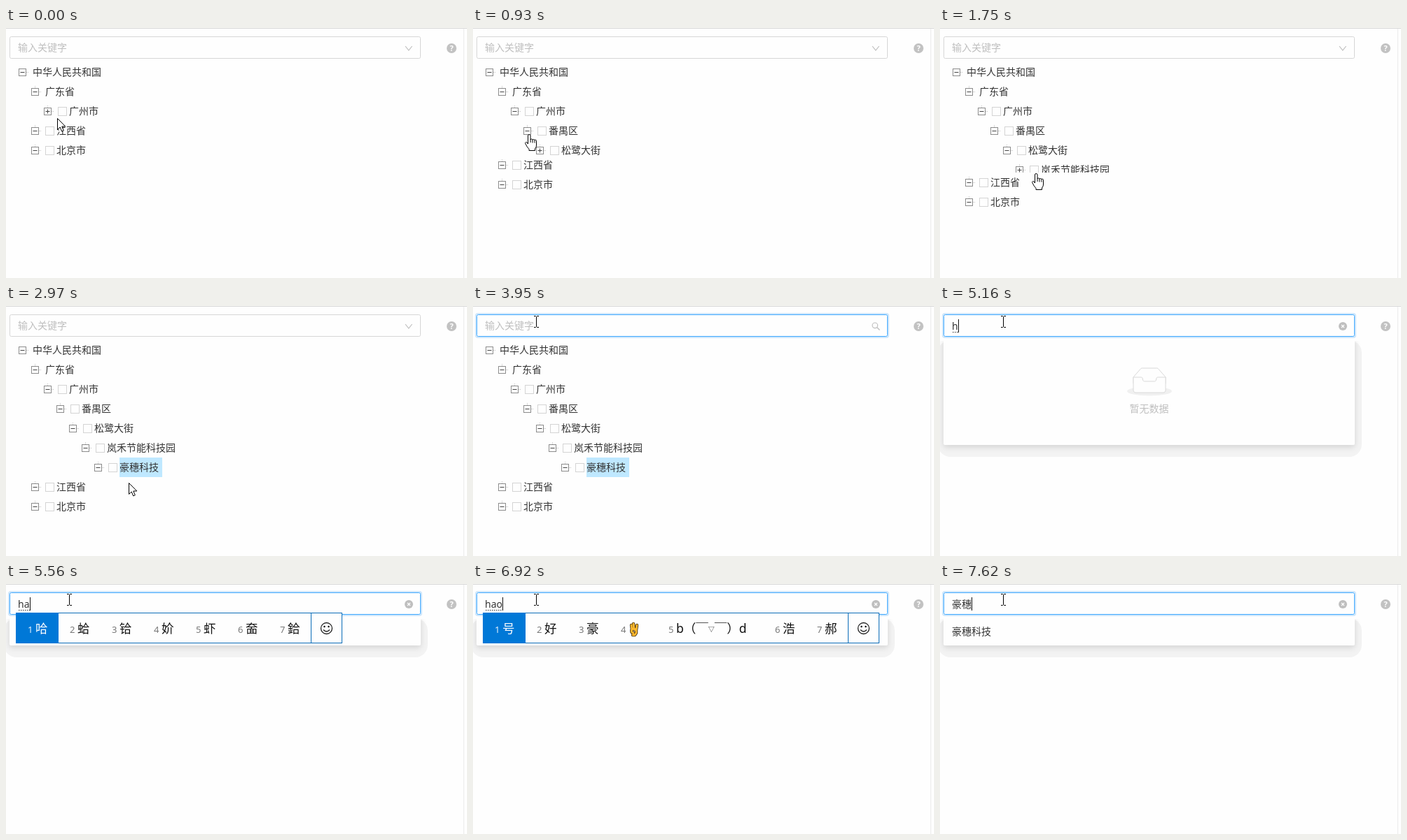
An HTML page that plays this animation: 658x358 px, repeating every 8 s.

```html
<!DOCTYPE html>
<html lang="zh-CN">
<head>
<meta charset="utf-8">
<title>Tree search</title>
<style>
html, body { margin: 0; width: 100%; height: 100%; overflow: hidden; background: #fefefe; }
svg { display: block; font: 14px 'Noto Sans', 'Noto Sans CJK SC', 'Noto Sans CJK', sans-serif; }
text { white-space: pre; }
.panel { filter: drop-shadow(0 3px 4px rgba(0,0,0,.13)); }
</style>
</head>
<body>
<svg id="stage" width="658" height="358" viewBox="0 0 658 358"></svg>
<script>
const LOOP = 8000;
const stage = document.getElementById('stage');
const pen = document.createElement('canvas').getContext('2d');
pen.font = "14px 'Noto Sans', 'Noto Sans CJK SC', 'Noto Sans CJK', sans-serif";

// label, time the node opens (0 = already open)
const chain = [
  ['中华人民共和国', 0], ['广东省', 0], ['广州市', 240], ['番禺区', 780],
  ['松鹭大街', 1480], ['岚禾节能科技园', 2420], ['豪穗科技', 0]
];

// revealed height below the third row
const reveal = [
  [0, 0], [240, 9], [360, 28], [780, 38], [930, 49], [1080, 53], [1200, 56],
  [1750, 74], [1880, 80], [2010, 83], [2140, 84], [2420, 102], [2570, 112]
];

const pointer = [
  [0, 'arrow', 73, 129], [120, 'hand', 58, 117], [360, 'arrow', 66, 130],
  [510, 'arrow', 72, 141], [640, 'hand', 76, 147], [930, 'hand', 80, 152],
  [1080, 'hand', 84, 160], [1200, 'hand', 109, 172], [1480, 'hand', 100, 172],
  [1750, 'hand', 137, 208], [1880, 'hand', 128, 206], [2010, 'hand', 118, 203],
  [2140, 'hand', 113, 202], [2570, 'none', 0, 0], [2970, 'arrow', 175, 253],
  [3280, 'arrow', 150, 215], [3430, 'arrow', 90, 140], [3550, 'arrow', 24, 66],
  [3950, 'beam', 90, 22]
];

// time, input value, candidates; a candidate wider than one slot is [label, width]
const ha = ['哈', '蛤', '铪', '妎', '虾', '奤', '鉿'];
const smileText = ['b（￣▽￣）d', 152];
const typing = [
  [0, '', null],
  [5160, 'h', null],
  [5280, 'h', ['和', '会', '好', '或', '后', '还', '很']],
  [5560, 'ha', ha],
  [5810, 'hai', ['还', '海', '害', '孩', ['嗨嗨', 87], smileText, '亥']],
  [6240, 'ha', ha],
  [6770, 'hao', ['号', '好', '豪', ['ok', 68], smileText, '浩', '郝']],
  [7200, "hao's", [['好似', 79], ['好是', 79], ['好时', 79], ['好事', 79], ['豪', 60], ['好', 60]]],
  [7340, "hao'su", [['好速', 79], ['豪宿', 79], ['好诉', 79], ['豪', 60], ['好', 60]]],
  [7480, "hao'sui", [['豪穗', 79], ['好碎', 79], ['好随', 79], ['豪', 60], ['好', 60]]],
  [7620, '豪穗', null]
];

const at = (keys, t) => keys.reduce((cur, k) => k[0] <= t ? k : cur);
const rect = (x, y, w, h, more = '') => `<rect x="${x}" y="${y}" width="${w}" height="${h}" ${more}/>`;
const text = (x, y, s, fill = '#333', more = '') => `<text x="${x}" y="${y}" fill="${fill}" ${more}>${s}</text>`;
const path = (d, stroke, more = '') => `<path d="${d}" stroke="${stroke}" fill="none" ${more}/>`;

function node(label, depth, y, open, boxed, selected) {
  const ex = 18 + 18 * depth, cx = ex + 20, mid = ex + 5.5;
  const ticks = `M${ex + 11} ${y + .5}h4` + (depth ? `M${mid} ${y - 5}v-4` : '');
  const tx = cx + (boxed ? 16 : 0);
  return (selected ? rect(tx, y - 14, 61, 28, 'fill="#bfe8ff"') : '')
    + path(ticks, '#c4c4c4', 'stroke-dasharray="1 1"')
    + rect(ex + .5, y - 4.5, 10, 10, 'fill="#fefefe" stroke="#8c8c8c"')
    + path(`M${ex + 2.5} ${y + .5}h6` + (open ? '' : `M${mid} ${y - 2.5}v6`), '#444')
    + (boxed ? rect(cx + .5, y - 5.5, 12, 12, 'fill="#fefefe" stroke="#d4d4d4"') : '')
    + text(tx, y + 5, label);
}

function tree(t) {
  const h = at(reveal, t)[1];
  const rows = chain.map(([label, opened], i) =>
    node(label, i, 63 + 28 * i, t >= opened, i > 1, i === 6 && t >= 2570)).join('');
  return `<clipPath id="fold">${rect(0, 48, 658, 85 + h)}</clipPath><g clip-path="url(#fold)">${rows}</g>`
    + node('江西省', 1, 147 + h, true, true) + node('北京市', 1, 175 + h, true, true);
}

function emptyBox() {
  return `<g transform="translate(267 89)"><ellipse cx="32" cy="33" rx="32" ry="6.5" fill="#f0f0f0"/>
    <g stroke="#d9d9d9" fill="#fefefe"><path d="M55 12.8L44.9 1.3C44.4.5 43.7 0 42.9 0H21.1c-.8 0-1.5.5-2 1.3L9 12.8V22h46z"/>
    <path d="M41.6 16c0-1.700 1-3 2.200-3H55v18.100C55 33.300 53.700 35 52 35H12C10.300 35 9 33.300 9 31.100V13h11.200c1.200 0 2.200 1.300 2.200 3s1 2.900 2.200 2.900h14.800c1.200 0 2.200-1.300 2.200-2.900z"/></g></g>`
    + text(298.5, 152, '暂无数据', '#bfbfbf', 'text-anchor="middle"');
}

function panel(t) {
  const bottom = t < 5560 ? 199 : 88, ease = t < 4190 ? .5 : 1;
  const body = rect(-3, 49, 605, bottom - 32, 'rx="18" fill="#f3f3f3"')
    + rect(5, 46, 587, bottom - 46, 'rx="2" fill="#fefefe" class="panel"')
    + rect(0, 45, 606, 5, 'fill="#fefefe"')
    + (t < 5560 ? emptyBox() : t >= 7620 ? text(17, 73, '豪穗科技') : '');
  return `<g opacity="${ease}" transform="translate(0 48) scale(1 ${.8 + .2 * ease}) translate(0 -48)">${body}</g>`;
}

function field(t, value, composing) {
  const focus = t >= 3950;
  let out = (focus ? rect(4, 11, 589, 34, 'rx="3" fill="none" stroke="#cfe7fb" stroke-width="2"') : '')
    + rect(5.5, 12.5, 586, 31, `rx="2" fill="#fefefe" stroke="${focus ? '#40a9ff' : '#d6d6d6'}"`)
    + (value ? text(17, 34, value) : text(17, 33, '输入关键字', '#bfbfbf'));
  const end = 17 + Math.round(pen.measureText(value).width);
  if (composing) out += path(`M18 37.5H${end}`, '#333', 'stroke-dasharray="1.500 1.500"');
  const caretOn = t >= 4070 && (t < 4610 || t >= 5160);
  if (caretOn) out += path(`M${end + .5} 19v19`, '#111');
  if (value) out += '<circle cx="575" cy="29" r="6" fill="#bfbfbf"/>' + path('M573 27l4 4m0-4l-4 4', '#fff', 'stroke-width="1.200"');
  else if (focus) out += '<circle cx="573.8" cy="27.800" r="3.800" fill="none" stroke="#bfbfbf" stroke-width="1.200"/>' + path('M576.500 30.500l4 4', '#bfbfbf', 'stroke-width="1.400"');
  else out += path('M570 26l4.800 6 4.800-6', '#bfbfbf', 'stroke-width="1.200"');
  return out;
}

function okHand(x) {
  const d = `M${x + 4} 66l-1-7m4 6l-1-8m4 9l1-7M${x + 9} 66a3 3 0 1 0-3 4M${x + 10} 66v4l-2 3h-3`;
  const round = 'stroke-linecap="round" stroke-linejoin="round" stroke-width=';
  return path(d, '#3b2a12', round + '"4.400"') + path(d, '#fdb92e', round + '"2.800"');
}

function candidates(list) {
  let x = 15, items = '';
  list.forEach((item, i) => {
    const [label, width] = Array.isArray(item) ? item : [item, 60];
    const ink = i ? '#111' : '#fff';
    if (!i) items += rect(14, 41, width + 1, 44, 'fill="#0078d7"');
    items += text(x + 16, 70, i + 1, i ? '#777' : '#e4f1fc', 'font-size="13"');
    items += label === 'ok' ? okHand(x + 28)
      : text(x + 27, 70, label.replace('▽', '<tspan font-size="9" dy="-2">▽</tspan><tspan dy="2">') + (label.includes('▽') ? '</tspan>' : ''), ink, 'font-size="17.500"');
    x += width;
  });
  return rect(14.5, 41.5, x + 30, 43, 'fill="#fefefe" stroke="#0a6cb8"') + items
    + path(`M${x + .5} 41v44`, '#0a6cb8')
    + `<circle cx="${x + 22.5}" cy="63.500" r="8" fill="none" stroke="#222" stroke-width="1.300"/>`
    + `<circle cx="${x + 19.5}" cy="61" r="1.200"/><circle cx="${x + 25.5}" cy="61" r="1.200"/>`
    + path(`M${x + 18} 65.500q4.500 5 9 0`, '#222', 'stroke-width="1.300"');
}

const shapes = {
  none: '',
  arrow: '<path d="M.5 .5v16l3.700-3.500 2.500 6 2.600-1.100-2.500-5.900h5z" fill="#fff" stroke="#000"/>',
  hand: '<path d="M-1.500 14V2q0-1.500 1.700-1.500T2 2v6q0-1 1.500-1T5 8.500q0-1 1.500-1T8 9.200q0-1 1.200-1t1.300 1.500V16q0 3-2 5v2.500H0V21.500q-3-3-5-7.500-1-2 .500-2.500T-1.500 14zM2 8v4M5 8.500v4M8 9.500v3" fill="#fff" stroke="#000"/>',
  beam: '<path d="M-3 -7.500h2.500l1 1 1-1H4M-3 8.500h2.500l1-1 1 1H4M.5 -6.500v14" fill="none" stroke="#000"/>'
};

const frame = path('M0 .5H658', '#d9d9d9') + path('M653.500 1V358', '#ebebeb')
  + '<circle cx="636" cy="29" r="7" fill="#c2c2c2"/>'
  + text(636, 33, '?', '#fff', 'font-size="11" font-weight="700" text-anchor="middle"');

function scene(t) {
  const [, value, list] = at(typing, t);
  const [, kind, x, y] = at(pointer, t);
  const composing = t >= 5160 && t < 7620;
  return frame + (t < 4070 ? tree(t) : panel(t)) + field(t, value, composing)
    + (list ? candidates(list) : '')
    + `<g transform="translate(${x} ${y})">${shapes[kind]}</g>`;
}

let shown = '', start = performance.now();
function draw(now) {
  const next = scene(Math.max(0, now - start) % LOOP);
  if (next !== shown) stage.innerHTML = shown = next;
  requestAnimationFrame(draw);
}
draw(start);
</script>
</body>
</html>
```
